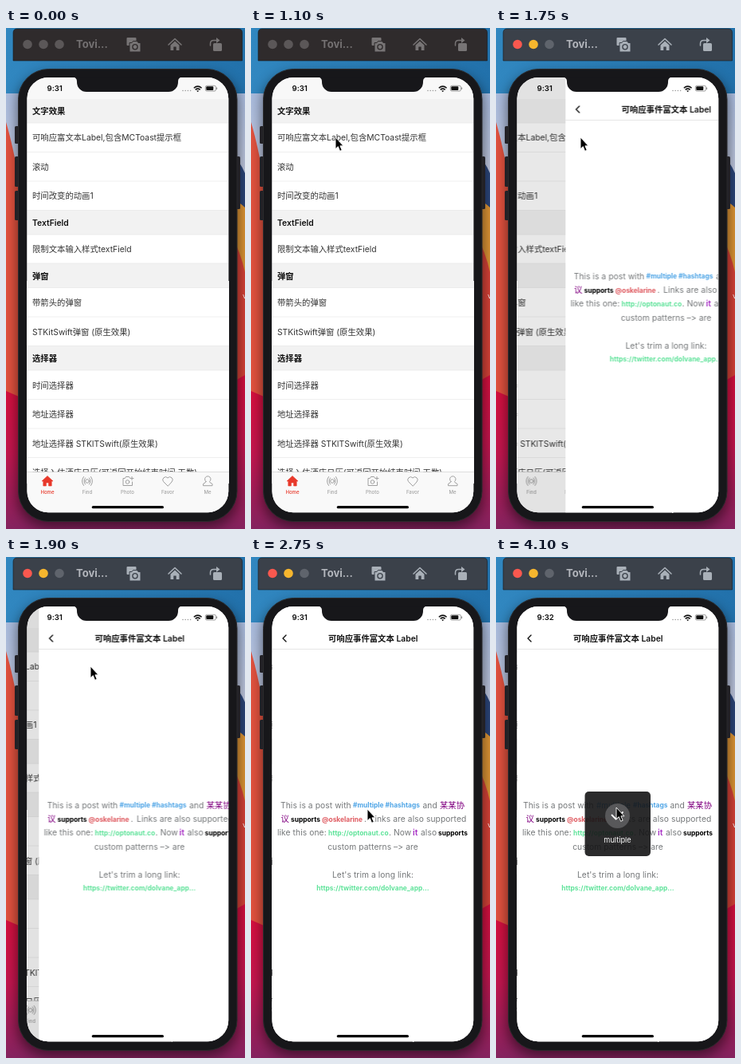
Recreate the animation shown at these times as an HTML page. Size 300 px wide and 628 px high, loop 4300 ms.

```html
<!DOCTYPE html>
<html lang="zh-CN">
<head>
<meta charset="utf-8">
<title>Rich text label demo</title>
<style>
html, body { margin: 0; width: 100%; height: 100%; overflow: hidden; background: #2f7fc0; }
svg { display: block; width: 100%; height: 100%; }
text {
  font-family: Inter, "Noto Sans CJK SC", "Noto Sans CJK JP", "Noto Sans CJK", sans-serif;
  font-feature-settings: "calt" 0; white-space: pre;
}
.row { font-size: 10.35px; fill: #333; }
.head { font-size: 10.35px; font-weight: 600; fill: #111; }
.tab { font-size: 6.1px; font-weight: 500; fill: #a3a3a3; text-anchor: middle; }
.body { font-size: 10.25px; letter-spacing: .08px; fill: #747779; }
.bold { font-size: 8.4px; font-weight: 700; }
.clock { font-size: 9.6px; font-weight: 600; fill: #0a0a0a; }
.tag { fill: #4fa5e6; }
.user { fill: #df5a60; }
.link { fill: #5fe39a; }
.plum { font-size: 10.35px; font-weight: 500; fill: #800080; }
.line { fill: none; stroke-linecap: round; stroke-linejoin: round; }
.name { font-size: 13px; font-weight: 700; }

.idle, .live, .list, .page, .dim, .cursor, .plain, .hit, .toast, .t31, .t32 {
  animation: 4300ms linear infinite both;
}
.idle { --bar: #2f2b2c; color: #777475; animation-name: idle; animation-timing-function: step-end; }
.live { --bar: #3b414a; color: #a9b0b8; animation-name: live; animation-timing-function: step-end; }
.plain { animation-name: plain; animation-timing-function: step-end; }
.hit { animation-name: hit; animation-timing-function: step-end; }
.t31 { animation-name: t31; animation-timing-function: step-end; }
.t32 { animation-name: t32; animation-timing-function: step-end; }
.list { animation-name: list; }
.page { animation-name: page; }
.dim { animation-name: dim; }
.toast { animation-name: toast; }
.cursor { animation-name: cursor; }
.bar { fill: var(--bar); stroke: #16181c; stroke-width: .6; }

@keyframes idle { 0% { opacity: 1 } 33.72%, 100% { opacity: 0 } }
@keyframes live { 0% { opacity: 0 } 33.72%, 100% { opacity: 1 } }
@keyframes plain { 0% { opacity: 1 } 81.39%, 100% { opacity: 0 } }
@keyframes hit { 0% { opacity: 0 } 81.39%, 100% { opacity: 1 } }
@keyframes t31 { 0% { opacity: 1 } 94.18%, 100% { opacity: 0 } }
@keyframes t32 { 0% { opacity: 0 } 94.18%, 100% { opacity: 1 } }
@keyframes page {
  0%, 36.28% { transform: translateX(253px); animation-timing-function: cubic-bezier(.2,.44,.2,1) }
  49.07%, 100% { transform: none }
}
@keyframes list {
  0%, 36.28% { transform: none; animation-timing-function: cubic-bezier(.2,.44,.2,1) }
  49.07%, 100% { transform: translateX(-75.6px) }
}
@keyframes dim {
  0%, 36.28% { opacity: 0; animation-timing-function: cubic-bezier(.2,.44,.2,1) }
  49.07%, 100% { opacity: .12 }
}
@keyframes toast {
  0%, 82.33% { opacity: 0; animation-timing-function: ease-in-out }
  88.37%, 100% { opacity: 1 }
}
@keyframes cursor {
  0%, 1.16% { transform: translate(302px, 630px) }
  8.14%, 12.79% { transform: translate(285px, 590px); animation-timing-function: ease-in-out }
  24.42%, 54.65% { transform: translate(106px, 137px); animation-timing-function: ease-in-out }
  63.72%, 69.3% { transform: translate(146px, 316px); animation-timing-function: ease-in-out }
  76.74%, 100% { transform: translate(151px, 314px) }
}
</style>
</head>
<body>
<svg viewBox="0 0 300 628" preserveAspectRatio="none">
  <defs>
    <linearGradient id="sky"><stop offset="0" stop-color="#3187c0"/><stop offset="1" stop-color="#2271ab"/></linearGradient>
    <linearGradient id="deep" x2="0" y2="1">
      <stop offset="0" stop-color="#d6103f"/><stop offset=".45" stop-color="#c4164f"/><stop offset="1" stop-color="#84235f"/>
    </linearGradient>
    <linearGradient id="pale" x2="0" y2="1">
      <stop offset="0" stop-color="#a9bbdd"/><stop offset="1" stop-color="#c9cbdc"/>
    </linearGradient>
    <filter id="soft" x="-20%" y="-20%" width="140%" height="140%"><feGaussianBlur stdDeviation="8"/></filter>
    <clipPath id="screen"><rect x="26.500" y="62" width="252.700" height="545.300" rx="26.500"/></clipPath>
    <clipPath id="rows"><rect x="26" y="62" width="254" height="495"/></clipPath>
    <g id="tools">
      <rect x="151.500" y="12" width="12" height="10" rx="1" fill="currentColor"/>
      <path d="M155 18.500h3l1.500-2h5l1.500 2h3v11.500h-14z" fill="currentColor" stroke="var(--bar)" stroke-width="1"/>
      <circle cx="162" cy="23.800" r="3.100" fill="none" stroke="var(--bar)" stroke-width="1.300"/>
      <path d="M204 21l8-7.500 8 7.500" class="line" stroke="currentColor" stroke-width="1.600"/>
      <path d="M206.500 21.500l5.500-5 5.500 5V28h-3.800v-4.500h-3.400V28h-3.800z" fill="currentColor"/>
      <rect x="260" y="19" width="11" height="10" rx="1.500" fill="currentColor"/>
      <path d="M256.500 22v-2.500q0-4 4-4h4" class="line" stroke="currentColor" stroke-width="1.500"/>
      <path d="M264 12l4.500 3.500-4.500 3.500z" fill="currentColor"/>
    </g>
  </defs>

  <!-- desktop -->
  <rect width="300" height="628" fill="url(#sky)"/>
  <rect y="82" width="300" height="150" fill="url(#pale)"/>
  <path d="M0 118Q9 148 17 195V628H0z" fill="#e2523f"/>
  <path d="M0 455L150 520V628H0z" fill="url(#deep)"/>
  <path d="M284 158Q294 168 300 182V240H284z" fill="#2b4478"/>
  <path d="M284 214Q294 219 300 225V320H284z" fill="#dc9435"/>
  <path d="M284 262Q294 280 300 306V628H150V262z" fill="#d64238"/>
  <path d="M150 520L300 435V628H150z" fill="url(#deep)"/>
  <text x="297" y="339" font-size="9" fill="#fff">v</text>
  <rect x="14" y="58" width="278" height="568" rx="38" filter="url(#soft)" opacity=".5"/>

  <!-- window bar -->
  <g class="idle">
    <path class="bar" d="M9 41V6q0-5 5-5H291.500q5 0 5 5V41z"/>
    <g fill="#5b5758"><circle cx="27" cy="20.500" r="5.800"/><circle cx="47" cy="20.500" r="5.800"/><circle cx="67" cy="20.500" r="5.800"/></g>
    <text class="name" x="88" y="25.300" fill="#747172">Tovi...</text>
    <use href="#tools"/>
  </g>
  <g class="live">
    <path class="bar" d="M9 41V6q0-5 5-5H291.500q5 0 5 5V41z"/>
    <circle cx="27" cy="20.500" r="5.800" fill="#f9584f"/>
    <circle cx="47" cy="20.500" r="5.800" fill="#f6b62e"/>
    <circle cx="67" cy="20.500" r="5.800" fill="#5f646c"/>
    <text class="name" x="88" y="25.300" fill="#b3b6bc">Tovi...</text>
    <use href="#tools"/>
  </g>

  <!-- phone body -->
  <g fill="#222126">
    <rect x="11" y="123" width="7" height="22" rx="1.500"/><rect x="11" y="161" width="7" height="38" rx="1.500"/>
    <rect x="11" y="204" width="7" height="37" rx="1.500"/><rect x="287" y="161" width="7" height="66" rx="1.500"/>
  </g>
  <rect x="15.500" y="51.500" width="274.500" height="567" rx="38" fill="#17171a" stroke="#2a2a2c"/>

  <g clip-path="url(#screen)">
    <rect x="26" y="62" width="254" height="546" fill="#fff"/>

    <!-- home list -->
    <g class="list">
      <rect x="26" y="62" width="254" height="546" fill="#fff"/>
      <rect x="26" y="62" width="254" height="27" fill="#f8f8f8"/>
      <g fill="#f2f2f2">
        <rect x="26" y="89" width="254" height="30"/><rect x="26" y="228.500" width="254" height="30.500"/>
        <rect x="26" y="295" width="254" height="30.500"/><rect x="26" y="398.500" width="254" height="30.500"/>
      </g>
      <path d="M26 119H280M26 155.500H280M26 192H280M26 228.500H280M26 259H280M26 295H280M26 325.500H280M26 362H280M26 398.500H280M26 429H280M26 465.500H280M26 502H280M26 538.500H280" stroke="#e4e4e4" stroke-width=".6"/>
      <g clip-path="url(#rows)">
        <text class="head" x="33" y="107.700">文字效果</text>
        <text class="row" x="33" y="141.200">可响应富文本Label,包含MCToast提示框</text>
        <text class="row" x="33" y="177.700">滚动</text>
        <text class="row" x="33" y="214.200">时间改变的动画1</text>
        <text class="head" x="33" y="247.700">TextField</text>
        <text class="row" x="33" y="281">限制文本输入样式textField</text>
        <text class="head" x="33" y="314.500">弹窗</text>
        <text class="row" x="33" y="348">带箭头的弹窗</text>
        <text class="row" x="33" y="384.500">STKitSwift弹窗 (原生效果)</text>
        <text class="head" x="33" y="418">选择器</text>
        <text class="row" x="33" y="451.500">时间选择器</text>
        <text class="row" x="33" y="488">地址选择器</text>
        <text class="row" x="33" y="524.500">地址选择器 STKITSwift(原生效果)</text>
        <text class="row" x="33" y="561">选择入住酒店日历(可返回开始结束时间,天数)</text>
      </g>
      <rect x="26" y="556.500" width="254" height="52" fill="#f9f9f9"/>
      <path d="M26 556.500H280" stroke="#d2d2d2" stroke-width=".7"/>
      <path d="M45 568l7-6.500 7 6.500h-1.800v6h-3.600v-4h-3.200v4h-3.600v-6z" fill="#e8392b" stroke="#e8392b" stroke-width=".6" stroke-linejoin="round"/>
      <g class="line" stroke="#a0a0a0" stroke-width="1">
        <circle cx="102" cy="568" r="2.300"/>
        <path d="M99.500 564q-3 4 0 8M104.500 564q3 4 0 8M97.500 562.500q-4 5.500 0 11M106.500 562.500q4 5.500 0 11"/>
        <path d="M155.500 564l-1-1.500h-4l-1.200 2H147v9h11.500V569M156 564.500h4M158 562.500v4"/><circle cx="152.500" cy="569" r="2.300"/>
        <path d="M203 574l-5.300-5.300a3.500 3.500 0 0 1 5.300-4.700 3.500 3.500 0 0 1 5.300 4.700z"/>
        <path d="M251 568.500a3.700 3.700 0 1 1 4.500 0q0 1.500 3 2.500.8.500.5 2.700h-11.500q-.3-2.200.5-2.700 3-1 3-2.500z"/>
      </g>
      <text class="tab" x="52" y="584" style="fill:#e8392b">Home</text>
      <text class="tab" x="102" y="584">Find</text>
      <text class="tab" x="152.500" y="584">Photo</text>
      <text class="tab" x="203" y="584">Favor</text>
      <text class="tab" x="253" y="584">Me</text>
    </g>
    <rect class="dim" x="26" y="62" width="254" height="546"/>

    <!-- detail page -->
    <g class="page">
      <rect x="26.500" y="62" width="254" height="546" fill="#fff"/>
      <path d="M26.500 115.500H280" stroke="#dcdcdc" stroke-width=".7"/>
      <path d="M44 98l-4 4 4 4" class="line" stroke="#111" stroke-width="1.400"/>
      <text class="head" x="97" y="105.700">可响应事件富文本<tspan x="182.500">Label</tspan></text>

      <g class="plain">
        <text class="body" x="37" y="314.500">This is a post with</text>
        <text class="bold tag" x="128" y="314.300">#multiple #hashtags</text>
        <text class="body" x="215.500" y="314.500">and</text>
        <text class="plum" x="237" y="314.700">某某协</text>
      </g>
      <g class="hit">
        <text class="body" x="34" y="314.500">This is a post with</text>
        <text x="126" y="314.500" font-size="9.900" class="tag">#multiple</text>
        <text class="bold tag" x="172" y="314.300">#hashtags</text>
        <text class="body" x="218.500" y="314.500">and</text>
        <text class="plum" x="240" y="314.700">某某协</text>
      </g>
      <text class="plum" x="37.500" y="332">议</text>
      <text class="bold" x="50" y="331.500">supports</text>
      <text class="bold user" x="89" y="331.500">@oskelarine</text>
      <text class="body" x="142" y="331.800">.<tspan x="149.500">Links are also supported</tspan></text>
      <text class="body" x="33" y="349.300">like this one:</text>
      <text class="bold link" x="97" y="349">http://optonaut.co</text>
      <text class="body" x="173" y="349.300">. Now</text>
      <text class="body" x="203" y="349.300" style="fill:#a62cc4;font-weight:600">it</text>
      <text class="body" x="213" y="349.300">also</text>
      <text class="bold" x="235" y="349">supports</text>
      <text class="body" x="153" y="366.800" text-anchor="middle">custom patterns –&gt; are</text>
      <text class="body" x="153" y="401.700" text-anchor="middle">Let's trim a long link:</text>
      <text class="bold link" x="153" y="418" text-anchor="middle">https://twitter.com/dolvane_app...</text>
    </g>

    <!-- status bar -->
    <text class="clock t31" x="51.500" y="79.200">9:31</text>
    <text class="clock t32" x="51.500" y="79.200">9:32</text>
    <path d="M222 78.500h11" class="line" stroke="#999" stroke-width="1.600" stroke-dasharray="0 3.200"/>
    <path d="M235.800 75.300q4.900-4.300 9.800 0M237.700 77.400q3-2.500 6 0" fill="none" stroke="#111" stroke-width="1.500"/>
    <path d="M240.700 80.300l-1.500-1.600q1.500-1 3 0z" fill="#111"/>
    <rect x="250.300" y="72.300" width="13.200" height="6.800" rx="2" fill="none" stroke="#777" stroke-width=".7"/>
    <rect x="251.300" y="73.300" width="9" height="4.800" rx="1" fill="#111"/>
    <path d="M264.700 74.500v2.400" stroke="#888" stroke-width="1"/>
    <rect x="107.700" y="599" width="90.300" height="3.300" rx="1.600" fill="#0a0a0a"/>

    <!-- toast -->
    <g class="toast">
      <rect x="111.500" y="294" width="82.500" height="81" rx="5" fill="#141416" fill-opacity=".9"/>
      <circle cx="152.500" cy="324.500" r="15.500" fill="#58585a"/>
      <path d="M145.500 323.500l5 5 8.500-8.500" class="line" stroke="#fff" stroke-width="1.800"/>
      <text x="152.500" y="357.500" font-size="9.200" fill="#fff" text-anchor="middle">multiple</text>
    </g>
  </g>

  <path d="M84 61.500q5 .5 5 5.500v1a12 12 0 0 0 12 12h103a12 12 0 0 0 12-12v-1q0-5 5-5.500z" fill="#17171a"/>

  <path class="cursor" d="M0 0V14.500L3.300 11.600 5.600 17.300 8.200 16.200 5.900 10.800H10z" fill="#000" stroke="#fff" stroke-width=".9" stroke-linejoin="round"/>
</svg>
</body>
</html>
```
